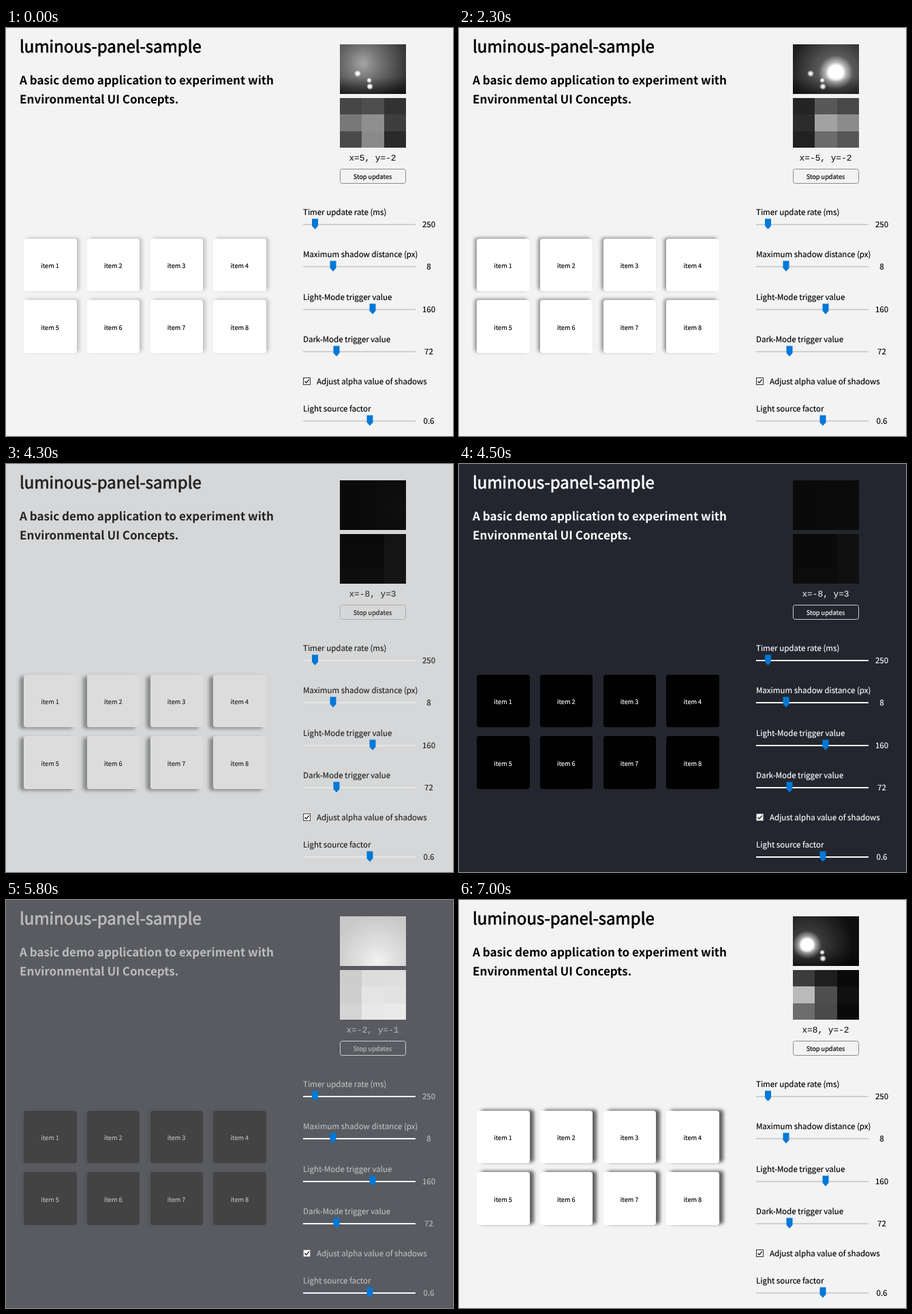
Recreate the animation shown at these times as an HTML page with a canvas. Size 656x600 px, loop 7.1 s.

```html
<!DOCTYPE html>
<html lang="en">
<head>
<meta charset="utf-8">
<title>Ambient light demo</title>
<style>
  html, body { margin: 0; width: 656px; height: 600px; overflow: hidden; }
  body { position: relative; }
  svg, canvas, .card { position: absolute; }
  svg { left: 0; top: 0; }
  canvas { left: 490px; top: 24px; }
  .card { width: 77.5px; height: 77.5px; border-radius: 4px; }
  text {
    font: 11.53px "Noto Sans CJK JP", "Noto Sans CJK SC", "Noto Sans CJK", sans-serif;
    fill: currentColor;
    stroke: currentColor;
    stroke-width: .15px;
    text-rendering: geometricPrecision;
  }
  .title { font-size: 24px; stroke-width: .7px; }
  .subtitle { font-size: 17.04px; font-weight: 700; stroke: none; }
  .small { font-size: 9.2px; }
  .mid { text-anchor: middle; }
  #readout { font: 12.8px "Liberation Mono", monospace; stroke: none; }
</style>
</head>
<body>
<canvas id="view" width="97" height="152"></canvas>
<svg id="ui" width="656" height="600"></svg>
<script>
const LOOP = 7100, STEP = 100, SAMPLE = 200, SHADOW_LAG = 250, SHADOW_SCALE = .75;
const TO_DARK = 4288, TO_LIGHT = 5776, FADE = 250;

// light: x offset, y offset, shadow alpha
// cam: light x, light y, core radius, glow grey, edge grey, spot opacity
// cells: greys of the 3 x 3 brightness grid
const ambient = { light: [5, -2, .2], cam: [34, 28, 0, 165, 48, 1],
  cells: [70, 78, 50, 120, 143, 62, 74, 138, 42] };
const top_ = { light: [4, 7, .35], cam: [46, 18, 13, 150, 40, .9],
  cells: [126, 228, 80, 112, 186, 76, 60, 120, 44] };
const low = { light: [-5, -3, .4], cam: [64, 44, 12, 140, 30, .9],
  cells: [36, 84, 70, 44, 160, 140, 34, 110, 90] };
const right = { light: [-7, 3, .45], cam: [59, 29, 12, 125, 22, .9],
  cells: [34, 124, 92, 38, 178, 130, 28, 80, 42] };
const covered = { light: [-8, 3, .42], cam: [90, 40, 0, 16, 10, 0],
  cells: [10, 10, 20, 11, 11, 21, 13, 14, 21] };
const black = { light: [-8, 3, .42], cam: [90, 40, 0, 12, 10, 0],
  cells: [9, 9, 12, 9, 9, 10, 10, 10, 10] };
const bright = { light: [-2, -1, .3], cam: [55, 66, 0, 243, 200, 0],
  cells: [205, 221, 222, 206, 228, 226, 212, 232, 234] };
const left = { light: [8, -2, .6], cam: [21, 42, 10, 85, 14, .9],
  cells: [60, 30, 10, 186, 78, 16, 108, 74, 10] };
const timeline = [[0, ambient], [350, ambient], [1100, top_], [1400, top_], [2100, low],
  [3200, right], [3500, right], [4000, covered], [4300, covered], [4500, black],
  [5000, black], [5700, bright], [5900, bright], [6650, left], [LOOP, left]];

const mix = (a, b, k) => a + (b - a) * k;
const clamp = v => Math.max(0, Math.min(1, v));
const grey = (v, a = 1) => `rgba(${v},${v},${v},${a})`;

function sceneAt(t, part) {
  const i = timeline.findIndex(([at]) => at > t);
  const [t0, a] = timeline[i - 1], [t1, b] = timeline[i];
  return a[part].map((v, n) => mix(v, b[part][n], (t - t0) / (t1 - t0)));
}

// Static interface
const ui = document.getElementById('ui');
const text = (x, y, s, cls = '') => `<text x="${x}" y="${y}" class="${cls}">${s}</text>`;
const sliders = [
  ['Timer update rate (ms)', 275, 453.5, '250'],
  ['Maximum shadow distance (px)', 337, 480, '8'],
  ['Light-Mode trigger value', 400, 538, '160'],
  ['Dark-Mode trigger value', 462, 485, '72'],
  ['Light source factor', 564, 534, '0.6']
];
let markup = text(20, 36, 'luminous-panel-sample', 'title')
  + text(20, 83, 'A basic demo application to experiment with', 'subtitle')
  + text(20, 110.5, 'Environmental UI Concepts.', 'subtitle')
  + '<text id="readout" x="538" y="195" class="mid"></text>'
  + '<rect id="button" x="490.5" y="207.5" width="96" height="21" rx="3" fill="none"/>'
  + text(538, 222, 'Stop updates', 'small mid')
  + '<rect id="box" x="436.5" y="514.5" width="10" height="10" fill="#fff"/>'
  + '<path d="M438.5 519.5l2.2 2.3 4.2-5" fill="none" stroke="#111" stroke-width="1.3"/>'
  + text(456, 524, 'Adjust alpha value of shadows');
for (const [label, y, x, value] of sliders) {
  markup += text(436, y, label) + text(620.5, y + 18, value, 'mid')
    + `<rect class="track" x="436" y="${y + 13}" width="165" height="2"/>`
    + `<path d="M${x - 4.5} ${y + 5.5}h9v10.5l-4.5 5-4.5-5z" fill="#0078d7"/>`;
}
const cards = [];
for (let i = 0; i < 8; i++) {
  const x = 26 + i % 4 * 92.8, y = i < 4 ? 309.7 : 400;
  const card = document.createElement('div');
  card.className = 'card';
  card.style.left = x + 'px';
  card.style.top = y + 'px';
  document.body.insertBefore(card, document.body.firstChild);
  cards.push(card);
  markup += text(x + 38.5, y + 43.6, 'item ' + (i + 1), 'small mid');
}
ui.innerHTML = markup;
const [readout, button, box] = ['readout', 'button', 'box'].map(id => document.getElementById(id));
const tracks = document.querySelectorAll('.track');
const ctx = document.getElementById('view').getContext('2d');

function glow(x, y, radius, stops) {
  const g = ctx.createRadialGradient(x, y, 0, x, y, radius);
  stops.forEach(([at, color]) => g.addColorStop(at, color));
  ctx.fillStyle = g;
  ctx.fillRect(0, 0, 97, 73);
}

function drawCamera([x, y, core, centre, edge, spots]) {
  glow(x, y, 68, [[0, grey(centre)], [.35, grey(mix(centre, edge, .42))], [1, grey(edge)]]);
  if (core > .5) {
    glow(x, y, core * 2.1, [[0, '#fff'], [.42, '#fff'], [.6, grey(255, .5)], [1, grey(255, 0)]]);
  }
  if (spots > .02) {
    const shade = ctx.createLinearGradient(0, 48, 0, 73);
    shade.addColorStop(0, grey(0, 0));
    shade.addColorStop(1, grey(0, .6 * spots));
    ctx.fillStyle = shade;
    ctx.fillRect(0, 48, 97, 25);
    for (const [sx, sy, r] of [[26, 43, 5], [43, 53, 4], [44, 62, 5]]) {
      glow(sx, sy, r, [[0, grey(255, spots)], [.4, grey(255, spots)], [1, grey(255, 0)]]);
    }
  }
}

function drawCells(cells) {
  const xs = [0, 32, 65, 97], ys = [79, 103, 128, 152];
  cells.forEach((v, i) => {
    const c = i % 3, r = Math.floor(i / 3);
    ctx.fillStyle = grey(v);
    ctx.fillRect(xs[c], ys[r], xs[c + 1] - xs[c], ys[r + 1] - ys[r]);
  });
}

const fade = (t, start) => 1 - (1 - clamp((t - start) / FADE)) ** 3;

function render(now) {
  const t = Math.floor(now % LOOP / STEP) * STEP;
  const sampled = Math.floor(t / SAMPLE) * SAMPLE;
  const dark = fade(t, TO_DARK) - fade(t, TO_LIGHT);
  const accent = clamp(dark * 4);

  document.body.style.background = `rgb(${[35, 37, 46].map(v => mix(243, v, dark))})`;
  document.body.style.color = grey(255 * dark);
  button.style.stroke = grey(mix(140, 205, accent));
  box.style.stroke = grey(50, 1 - dark);
  tracks.forEach(track => track.style.fill = grey(mix(208, 250, accent)));

  const [dx, dy, alpha] = sceneAt(Math.max(0, t - SHADOW_LAG), 'light');
  for (const card of cards) {
    card.style.background = grey(255 * (1 - dark));
    card.style.boxShadow =
      `${dx * SHADOW_SCALE}px ${dy * SHADOW_SCALE}px 5px ${grey(0, alpha * (1 - dark))}`;
  }

  const [x, y] = sceneAt(sampled, 'light').map(v => Math.round(v) || 0);
  readout.textContent = `x=${x}, y=${y}`;
  ctx.clearRect(0, 0, 97, 152);
  drawCamera(sceneAt(t, 'cam'));
  drawCells(sceneAt(sampled, 'cells'));
}

const begin = performance.now();
function tick() {
  render(performance.now() - begin);
  requestAnimationFrame(tick);
}
tick();
</script>
</body>
</html>
```
